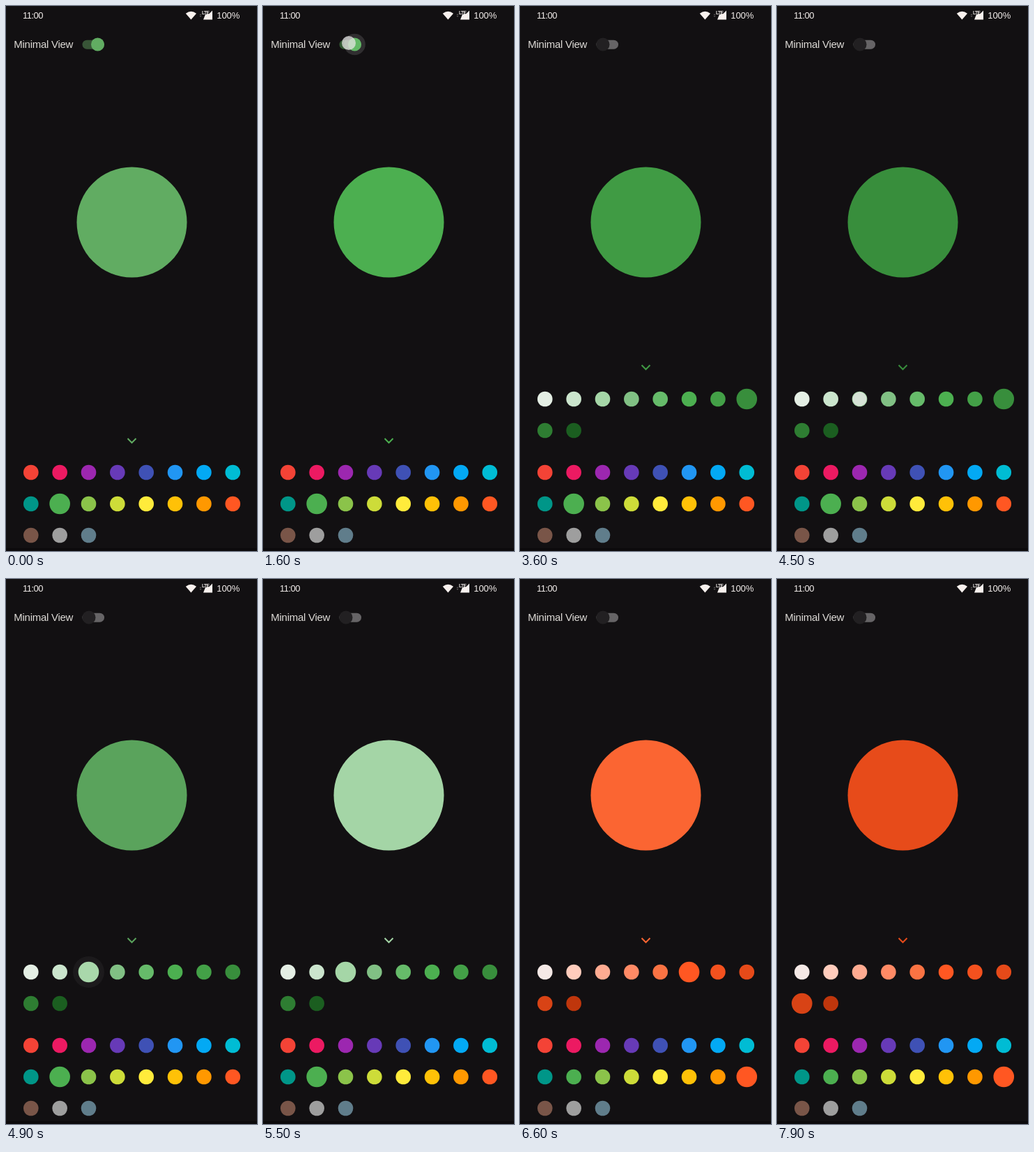
Animation of 360 by 780 pixels, one loop 8000 ms. Source, as an HTML page:

```html
<!DOCTYPE html>
<html lang="en">
<head>
<meta charset="utf-8">
<style>
  html, body { margin: 0; width: 100%; height: 100%; overflow: hidden; background: #121012; }
  svg { display: block; width: 360px; height: 780px; }
  text { font-family: "Liberation Sans", Arial, sans-serif; font-size: 13px; fill: #f1ecea; }
  #disc { fill: var(--c); }
  #arrow { fill: none; stroke: var(--c); stroke-width: 2; }
</style>
</head>
<body>
<svg id="stage" viewBox="0 0 360 780">
  <rect y="776" width="360" height="4" fill="#0c0a0c"/>
  <text x="24" y="18" letter-spacing="-.5">11:00</text>
  <text x="302.3" y="18" letter-spacing="-.1">100%</text>
  <g fill="#f8f1ee">
    <path d="M257.8 10.7Q265.5 4.7 273 10.7L265.4 19.5Z"/>
    <path d="M283 19.5H296V6.5L290.5 12H286Z"/>
    <path d="M277.5 13L279 11L280.5 13ZM277.5 14L279 16L280.5 14Z" opacity=".3"/>
  </g>
  <text x="281" y="11.6" letter-spacing="-.5" style="font-size:6.5px;font-weight:bold">LTE</text>
  <text x="11.3" y="60.3" letter-spacing="-.27" style="font-size:15px;fill:#dedbd7">Minimal View</text>
  <rect id="track" x="109.5" y="48.7" width="31.5" height="13" rx="6.5"/>
  <circle id="thumb" cy="55" r="9.5"/>
  <circle id="disc" cx="180.5" cy="309.5" r="79"/>
  <path id="arrow" d="M174.5 619L180.5 625L186.5 619"/>
  <clipPath id="clip"><rect id="window" width="360"/></clipPath>
  <g id="shades" clip-path="url(#clip)"></g>
  <g id="hues"></g>
  <circle id="ripple" fill="#fff"/>
  <circle id="finger" r="10" fill="#e6e6e4"/>
</svg>
<script>
const $ = id => document.getElementById(id);
const set = (el, attrs) => { for (const k in attrs) el.setAttribute(k, attrs[k]); };
const clamp = v => Math.max(0, Math.min(1, v));
const mix = (a, b, p) => `color-mix(in oklab, ${b} ${p * 100}%, ${a})`;
const colors = s => s.split(' ').map(c => '#' + c);

const LOOP = 8000, SMALL = 10.8, BIG = 14.8;
const HUES = colors('f44336 ec1a62 9c27b0 673ab7 3f51b5 2196f3 03a9f4 00bcd4 009688 4caf50 8bc34a cddc39 ffeb3b ffc107 ff9800 ff5722 795548 9e9e9e 607d8b');
const GREENS = colors('e4eee4 cbe5cd a5d6a7 81c084 66bb6a 4caf50 43a047 388e3c 2e7d32 1b5e20');
const ORANGES = colors('f5e9e6 ffccbc ffab91 ff8a65 fa7343 ff5722 f4511e e64a19 d84315 bf360c');

const spot = (i, top) => ({ x: 35.8 + 41.35 * (i % 8), y: top + 45 * Math.floor(i / 8) });
function dots(group, list, top) {
  return list.map((fill, i) => {
    const el = document.createElementNS('http://www.w3.org/2000/svg', 'circle');
    const { x, y } = spot(i, top);
    set(el, { cx: x, cy: y, fill });
    return group.appendChild(el);
  });
}
const shadeDots = dots($('shades'), GREENS, 562.5);
const hueDots = dots($('hues'), HUES, 667.5);

// Each list holds [time, value] pairs; a change starts at its time.
const SWITCH = 1680, REPAINT = 5930;
const shadePicks = [[-9e3, 5], [3207, 7], [4630, 2], [REPAINT, 5], [7507, 8]];
const huePicks = [[-9e3, 9], [REPAINT, 15]];
const paints = [[-9e3, '#9e9e9e'], [-520, '#4caf50'], [3207, '#388e3c'],
  [4630, '#a5d6a7'], [REPAINT, '#ff5722'], [7507, '#d84315']];
const taps = [
  { t: SWITCH, x: 123, y: 53, toggle: true },
  { t: 3207, ...spot(7, 562.5) },
  { t: 4630, ...spot(2, 562.5) },
  { t: REPAINT, ...spot(15, 667.5) },
  { t: 7507, ...spot(8, 562.5) }
];

// Critically damped spring from 0 to 1
const spring = (ms, w) => ms <= 0 ? 0 : 1 - (1 + w * ms / 1000) * Math.exp(-w * ms / 1000);

// cubic-bezier(.4, 0, .2, 1)
function ease(x) {
  if (x <= 0 || x >= 1) return clamp(x);
  let lo = 0, hi = 1, s;
  for (let i = 0; i < 24; i++) {
    s = (lo + hi) / 2;
    const q = 1 - s;
    if (1.2 * s * q * q + .6 * s * s * q + s ** 3 < x) lo = s; else hi = s;
  }
  return s * s * (3 - 2 * s);
}

function latest(list, t) {
  let i = list.length - 1;
  while (i && list[i][0] > t) i--;
  return { now: list[i], before: list[Math.max(0, i - 1)] };
}

function resize(circles, picks, t) {
  const { now, before } = latest(picks, t);
  const p = spring(t - now[0], 38.7);
  circles.forEach((el, i) => {
    const k = i === now[1] ? p : i === before[1] ? 1 - p : 0;
    el.setAttribute('r', SMALL + (BIG - SMALL) * k);
  });
}

function drawTouch(t, thumbX) {
  const tap = taps.find(p => t >= p.t - 140 && t < p.t + 370);
  $('ripple').style.display = $('finger').style.display = tap ? '' : 'none';
  if (!tap) return;
  const age = t - tap.t;
  const grow = clamp((age + 140) / 225);
  set($('ripple'), {
    cx: tap.toggle ? thumbX : tap.x,
    cy: tap.toggle ? 55 : tap.y,
    r: 9 + 13.5 * (1 - (1 - grow) ** 2),
    opacity: (tap.toggle ? .13 : .045) * clamp((370 - age) / 100)
  });
  set($('finger'), { cx: tap.x, cy: tap.y, opacity: .75 * clamp((40 - age) / 60) });
}

function draw(t) {
  const { now, before } = latest(paints, t);
  $('stage').style.setProperty('--c', mix(before[1], now[1], ease((t - now[0]) / 1000)));

  const off = ease((t - SWITCH) / 100);
  const thumbX = 131.5 - 12.5 * off;
  $('thumb').setAttribute('cx', thumbX);
  $('thumb').style.fill = mix('var(--c)', '#222022', off);
  $('track').style.fill = mix(mix('#121012', 'var(--c)', .48), '#666466', off);

  const open = spring(t - SWITCH, 20);
  $('arrow').setAttribute('transform', `translate(0 ${-105 * open})`);
  set($('window'), { y: 645 - 105 * open, height: 105 * open });
  $('shades').setAttribute('opacity', open);

  const palette = t < REPAINT ? GREENS : ORANGES;
  shadeDots.forEach((el, i) => el.setAttribute('fill', palette[i]));
  resize(shadeDots, shadePicks, t);
  resize(hueDots, huePicks, t);
  drawTouch(t, thumbX);
}

const start = performance.now();
function frame() {
  draw((performance.now() - start) % LOOP);
  requestAnimationFrame(frame);
}
frame();
</script>
</body>
</html>
```
